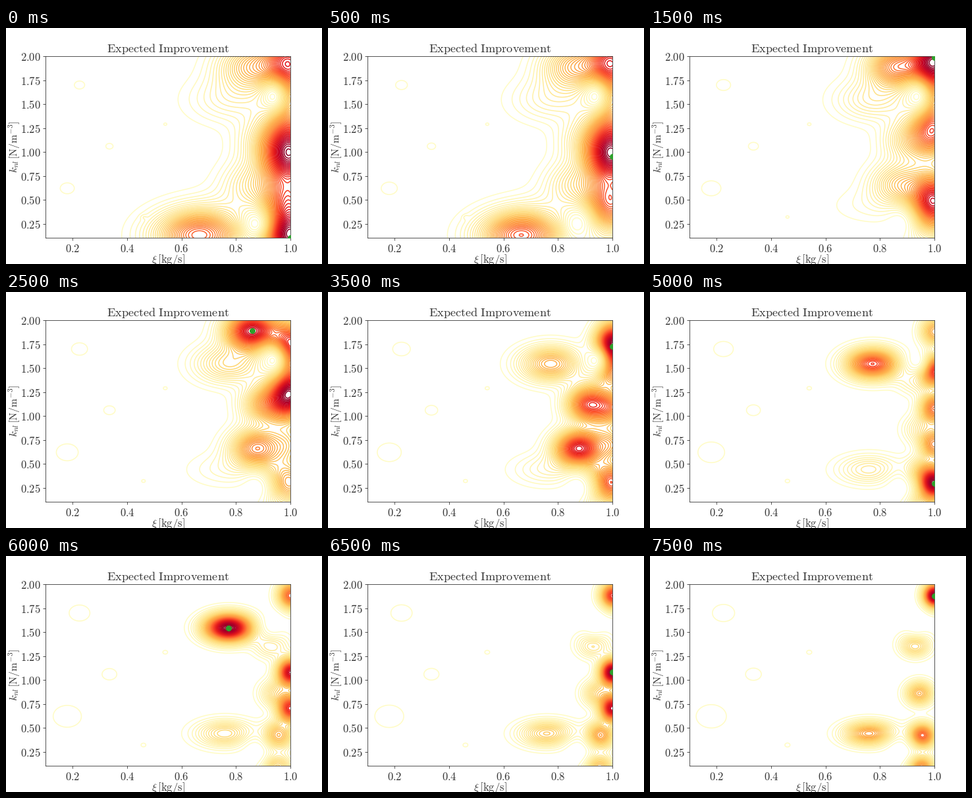
Animation, 480 px wide and 360 px high, one loop 8 s. Source, as a matplotlib script:

```python
import numpy as np
import matplotlib.pyplot as plt
from matplotlib.animation import FuncAnimation
from matplotlib.ticker import FuncFormatter, MultipleLocator

INK = "0.2"
plt.rcParams.update({
    "mathtext.fontset": "cm", "font.size": 15.9, "text.color": INK,
    "axes.edgecolor": INK, "xtick.color": INK, "ytick.color": INK,
})

XLIM, YLIM = (0.1, 1.0), (0.1, 2.0)
X, Y = np.meshgrid(np.linspace(*XLIM, 181), np.linspace(*YLIM, 191))
LEVELS = np.linspace(0.02, 1, 50)

# Points evaluated one per step, then peaks still waiting after the last step
SAMPLES = [
    (1, 0.1), (1, 0.95), (0.665, 0.13), (1, 1.99),
    (1, 0.5), (0.86, 1.89), (1, 1.25), (1, 1.725),
    (0.876, 0.66), (0.915, 1.12), (1, 0.295), (1, 1.48),
    (0.773, 1.545), (1, 1.08), (1, 0.7), (1, 1.88),
]
WAITING = [(0.955, 0.42), (0.95, 0.08), (0.76, 0.44), (0.945, 0.86), (0.93, 1.37)]
STEPS = len(SAMPLES)
PEAKS = list(enumerate(SAMPLES)) + list(enumerate(WAITING, STEPS + 2))

HOLES = [(0.935, 1.58), (0.87, 0.25)]
ISLANDS = [(0.225, 1.70, 0.036), (0.18, 0.62, 0.049), (0.335, 1.06, 0.0256),
           (0.54, 1.29, 0.0085), (0.46, 0.32, 0.0085)]


def bell(x, y, sx, sy):
    return np.exp(-((X - x) / sx) ** 2 / 2 - ((Y - y) / sy) ** 2 / 2)


def peak(x, y, turn, wait):
    """Later peaks are narrower; each one sharpens and rises until its turn."""
    spread = 1 + 0.06 * wait
    sx = 0.065 * 0.94 ** turn + 0.12 * (1 - x)
    sy = 0.175 * 0.95 ** turn
    return 0.845 ** wait * bell(x, y, sx * spread, sy * spread)


def improvement(step):
    z = sum(peak(x, y, turn, turn - step)
            for turn, (x, y) in PEAKS if turn >= step)
    for x, y in HOLES:
        z = z * (1 - 0.96 * bell(x, y, 0.037, 0.12))
    z = z / z.max()
    for x, y, size in ISLANDS:
        z = z + (0.023 + 0.001 * step) * bell(x, y, size, 2.2 * size)
    return z


def roman(digits):
    return FuncFormatter(lambda v, _: rf"$\mathrm{{{v:.{digits}f}}}$")


fig, ax = plt.subplots(figsize=(6.4, 4.8), dpi=75)
ax.set(xlim=XLIM, ylim=YLIM)
ax.xaxis.set_major_locator(MultipleLocator(0.2))
ax.yaxis.set_major_locator(MultipleLocator(0.25))
ax.xaxis.set_major_formatter(roman(1))
ax.yaxis.set_major_formatter(roman(2))
ax.set_title(r"$\mathrm{Expected\ Improvement}$", fontsize=17.5)
label = dict(ha="center", va="baseline", rotation_mode="anchor")
fig.text(246 / 480, 2 / 360, r"$\xi\,\mathrm{[kg/s]}$", **label)
fig.text(17.5 / 480, 178.5 / 360, r"$k_{nl}\,\mathrm{[N/m^{-3}]}$",
         rotation=90, fontsize=15.2, **label)
dot, = ax.plot([], [], "o", color="tab:green", ms=7.5, zorder=4)


def draw(step):
    for lines in list(ax.collections):
        lines.remove()
    ax.contour(X, Y, improvement(step), levels=LEVELS, cmap="YlOrRd",
               vmin=0, vmax=1, linewidths=1.5)
    x, y = SAMPLES[step]
    dot.set_data([x], [y])


anim = FuncAnimation(fig, draw, frames=STEPS, interval=500,
                     repeat=True, repeat_delay=0, cache_frame_data=False)
plt.show()
```
